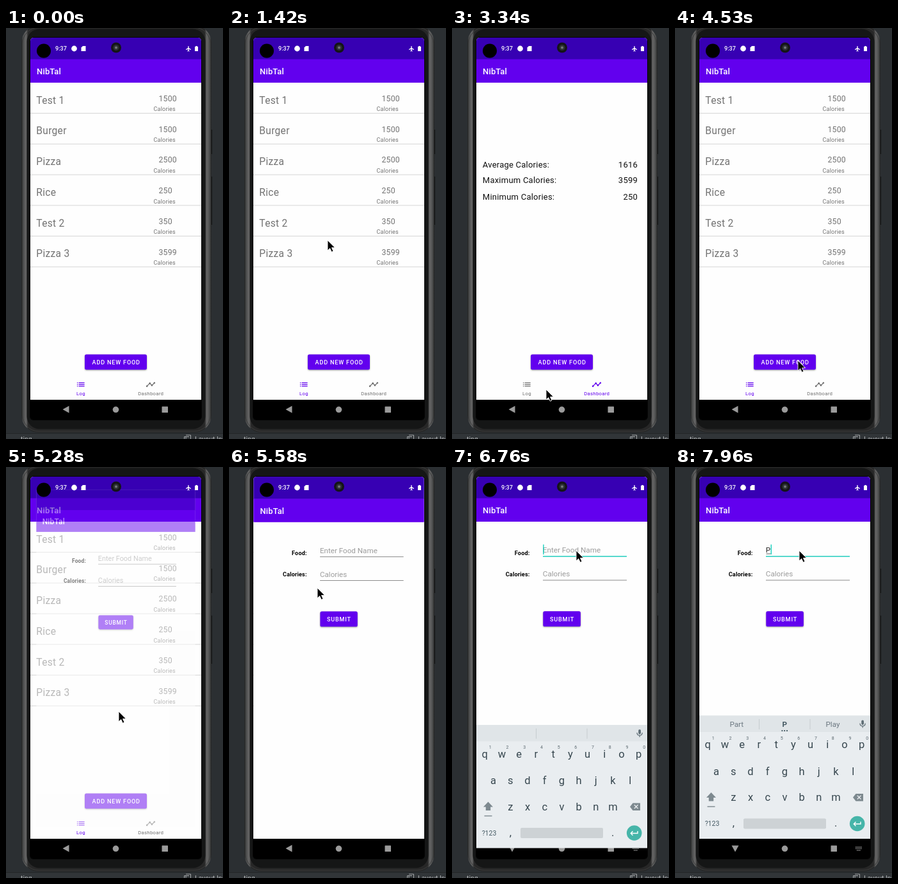
Animation of 339 by 639 pixels, one loop 8 s. Source, as an HTML page:

```html
<!DOCTYPE html>
<html lang="en">
<head>
<meta charset="utf-8">
<title>Food log</title>
<style>
html, body { margin: 0; width: 100%; height: 100%; overflow: hidden; background: #2b2f32; }
svg { display: block; width: 339px; height: 639px; font-family: Roboto, sans-serif; }
.title { font: 500 13px Roboto, sans-serif; letter-spacing: .0125em; fill: #fff; }
.btn { font: 500 9.1px Roboto, sans-serif; letter-spacing: .0893em; fill: #fff; text-anchor: middle; }
.food { font-size: 15.6px; letter-spacing: .0179em; fill: #737373; }
.num { font-size: 12.3px; letter-spacing: .0179em; fill: #737373; }
.unit { font-size: 9.1px; letter-spacing: .0179em; fill: #737373; }
.stat { font-size: 13px; letter-spacing: .0179em; fill: #111; }
.end { text-anchor: end; }
.label { font: 700 9.1px Roboto, sans-serif; letter-spacing: .0179em; fill: #000; text-anchor: end; }
.field { font-size: 11.7px; fill: #9c9c9c; }
.tab { font-size: 7.8px; letter-spacing: .0333em; text-anchor: middle; }
.item { color: #707070; fill: currentColor; stroke: none; }
.item.on { color: #6200ee; }
.key { font-size: 16.5px; fill: #37474f; text-anchor: middle; }
.hint { font-size: 7px; fill: #5c6970; text-anchor: middle; }
.word { font-size: 11.7px; fill: #6b7780; text-anchor: middle; }
.shade { filter: drop-shadow(0 1px 1px rgba(0,0,0,.38)); }
</style>
</head>
<body>
<svg viewBox="0 0 339 639">
  <defs>
    <linearGradient id="rim">
      <stop offset="0" stop-color="#1c1d1d"/><stop offset=".008" stop-color="#4b4c4c"/>
      <stop offset=".025" stop-color="#666"/><stop offset=".036" stop-color="#272727"/>
      <stop offset=".964" stop-color="#272727"/><stop offset=".975" stop-color="#666"/>
      <stop offset=".992" stop-color="#4b4c4c"/><stop offset="1" stop-color="#1c1d1d"/>
    </linearGradient>
    <clipPath id="screen"><rect x="38" y="15" width="267" height="594" rx="5"/></clipPath>
    <clipPath id="tabs"><rect x="38" y="541" width="267" height="37"/></clipPath>
    <g id="bars">
      <rect x="38" y="15" width="267" height="563" fill="#fefefe"/>
      <rect x="38" y="15" width="267" height="34" fill="#3700b3"/>
      <rect x="38" y="48.5" width="267" height="36.5" fill="#6200ee"/>
      <text class="title" x="48" y="72">NibTal</text>
    </g>
  </defs>

  <rect width="339" height="639" fill="#2b2f32"/>
  <rect y="630" width="339" height="9" fill="#313538"/>
  <path d="M0 630.5H339" stroke="#232628"/>
  <g fill="#b4b7b9" font-size="10.5">
    <text x="23" y="643">ting</text>
    <text x="295" y="643">Layout Inspector</text>
  </g>
  <path d="M278.5 642V635.5H286M281 642V635.5M281 633H288.500V640" fill="none" stroke="#a5a8aa"/>

  <path d="M319 158h3v38h-3zM319 231h3v75h-3z" fill="#101112"/>
  <rect x="24" y="-4" width="297" height="633" rx="27" fill="url(#rim)"/>
  <rect x="26" y="-1" width="293" height="628" rx="25" fill="none" stroke="#3b3c3c"/>
  <rect x="32.500" y="1.500" width="279" height="622" rx="20" fill="#151616"/>
  <rect x="37" y="14" width="269" height="596" rx="6" fill="#050505"/>

  <g clip-path="url(#screen)">
    <rect x="38" y="15" width="267" height="594"/>
    <g id="nav" fill="#9b9b9b">
      <path id="back" d="M88.500 593L98.500 587.500V598.500Z"/>
      <circle cx="171.500" cy="593.300" r="4.800"/>
      <rect x="243.500" y="588.500" width="9.500" height="9.500" rx=".6"/>
      <path id="ime" d="M282 591H292M282 593.300H292M284 596H290" stroke="#9b9b9b" stroke-width="1.300" stroke-dasharray="1.300 .8"/>
    </g>

    <g id="main">
      <use href="#bars"/>
      <g id="log"></g>
      <g id="stats"></g>
      <rect class="shade" x="123" y="507.500" width="97" height="23.700" rx="2.600" fill="#6200ee"/>
      <text class="btn" x="172.200" y="522.900">ADD NEW FOOD</text>
      <circle id="ripple" cy="566" r="34" fill="#ebebeb" clip-path="url(#tabs)"/>
      <g id="tabLog" class="item">
        <path transform="translate(109 546.500) scale(.65)" d="M3 11h2v2H3zM3 15h2v2H3zM3 7h2v2H3zM7 11h14v2H7zM7 15h14v2H7zM7 7h14v2H7z"/>
        <text class="tab" x="117" y="571.400">Log</text>
      </g>
      <g id="tabDash" class="item">
        <g transform="translate(218.200 546.500) scale(.65)">
          <path d="M3 16L10 9L15 14L21 8" fill="none" stroke="currentColor" stroke-width="2"/>
          <circle cx="3" cy="16" r="2"/><circle cx="10" cy="9" r="2"/>
          <circle cx="15" cy="14" r="2"/><circle cx="21" cy="8" r="2"/>
        </g>
        <text class="tab" x="226.200" y="571.400">Dashboard</text>
      </g>
    </g>

    <g id="form">
      <use href="#bars"/>
      <text class="label" x="121.500" y="136.500">Food:</text>
      <text class="label" x="121.500" y="169.900">Calories:</text>
      <text id="name" class="field" x="141.800" y="133">Enter Food Name</text>
      <text class="field" x="141.800" y="170.200">Calories</text>
      <path id="line" d="M142 139H273"/>
      <path d="M142 176H273" stroke="#8b8b8b"/>
      <path id="under" d="M142.500 135H149.500" stroke="#333" stroke-width=".8"/>
      <rect id="caret" y="120.500" width="1.300" height="15.500" fill="#03cdb9"/>
      <rect class="shade" x="142.300" y="224.300" width="58.600" height="23.700" rx="2.600" fill="#6200ee"/>
      <text class="btn" x="172" y="239.700">SUBMIT</text>
    </g>

    <g fill="#fff">
      <text x="77" y="35.400" font-size="9.100" font-weight="500">9:37</text>
      <circle cx="106.500" cy="32" r="4.400"/>
      <path d="M120 28h4.500v8h-7v-5.500z"/>
      <path d="M284.300 28.500q.7-1 1.400 0v2.500l3.300 2v1l-3.300-1v2l1 .8v.7l-1.700-.5-1.700.5v-.7l1-.8v-2l-3.300 1v-1l3.300-2z"/>
      <path d="M296.300 28h2.400v.9h1.300v7.100h-5v-7.100h1.300z"/>
    </g>
    <circle cx="59" cy="35.500" r="11"/>

    <g id="board">
      <rect x="38" y="386.500" width="267" height="191.500" fill="#e9edf0"/>
      <rect x="38" y="386.500" width="267" height="25.500" fill="#e0e5e8"/>
      <path d="M131.500 392V408M211 392V408" stroke="#c6cccf"/>
      <g id="words">
        <text class="word" x="96.300" y="404">Part</text>
        <text class="word" x="171.300" y="404" font-weight="700" style="fill:#455a64">P</text>
        <text class="word" x="246.500" y="404">Play</text>
        <path d="M166.500 410H176" stroke="#455a64" stroke-width="1.800" stroke-dasharray="1.800 2"/>
      </g>
      <rect x="291.200" y="393.500" width="3.800" height="7.500" rx="1.900" fill="#5f6e76"/>
      <path d="M289 398.500Q289 402.800 293.100 402.800T297.200 398.500M293.100 402.800V405.500" fill="none" stroke="#5f6e76" stroke-width="1.200"/>
      <g id="keys"></g>
      <path d="M56.500 506L64 514H60.200V519.500H52.800V514H49Z" fill="#7d898f"/>
      <path d="M50.500 528H62.500" stroke="#7d898f" stroke-width="1.400"/>
      <path d="M278 513.700L282.500 508H294V519.500H282.500Z" fill="#7d898f"/>
      <path d="M284.800 510.800L290.500 516.500M290.500 510.800L284.800 516.500" stroke="#e9edf0" stroke-width="1.300"/>
      <text x="58" y="558" font-size="10.500" fill="#455a64" text-anchor="middle">?123</text>
      <rect x="107" y="546.500" width="129" height="16" rx="2" fill="#cdd2d5"/>
      <circle cx="284.700" cy="554.500" r="11.800" fill="#46b5a9"/>
      <path d="M290 551.500V555H279.500M282.500 551.800L279.300 555L282.500 558.200" fill="none" stroke="#fff" stroke-width="1.400"/>
    </g>
  </g>

  <circle cx="172" cy="30.500" r="8" fill="#141516"/>
  <circle cx="172" cy="30.500" r="4.600" fill="#2d3133"/>
  <circle cx="172" cy="30.500" r="2" fill="#717579"/>

  <path id="mouse" d="M0 0V16L3.700 12.600L6.300 18.200L9 17L6.500 11.600H11.600Z" stroke="#fff" stroke-width=".9"/>
</svg>
<script>
const LOOP = 8000, START = 968, STEP = 148;
const $ = id => document.getElementById(id);
const show = (id, on) => $(id).style.display = on ? '' : 'none';
const text = (cls, x, y, s) => `<text class="${cls}" x="${x}" y="${y}">${s}</text>`;

const foods = [['Test 1', 1500], ['Burger', 1500], ['Pizza', 2500], ['Rice', 250], ['Test 2', 350], ['Pizza 3', 3599]];
$('log').innerHTML = foods.map(([name, cal], i) => {
  const y = i * 47.75;
  return text('food', 47.3, 117.5 + y, name) + text('num', 238.4, 113.9 + y, cal) +
    text('unit', 230.5, 129.3 + y, 'Calories') +
    `<path d="M38 ${132.6 + y}H305" stroke="#d6d6d6"/>`;
}).join('');

const stats = [['Average', 1616, 216.7], ['Maximum', 3599, 240.5], ['Minimum', 250, 266.6]];
$('stats').innerHTML = stats.map(([kind, cal, y]) =>
  text('stat', 47.8, y, kind + ' Calories:') + text('stat end', 290, y, cal)).join('');

const rows = [['qwertyuiop', 51.3, 437.3], ['asdfghjkl', 64.6, 478.6], ['zxcvbnm', 91.3, 519.2]];
$('keys').innerHTML = rows.map(([row, x, y], r) => [...row].map((c, i) => {
  const cx = x + i * 26.7;
  return text('key', cx, y, c) + (r ? '' : text('hint', cx + 8.5, y - 13.8, (i + 1) % 10));
}).join('')).join('') + text('key', 91.3, 559, ',') + text('key', 251.3, 559, '.');

// pointer stops: step, x, y
const path = [
  [0, 272, 90], [2, 190, 240], [4, 118, 420], [6, 188, 540], [7, 219, 566], [8, 221, 567],
  [12, 221, 567], [16, 147, 562], [18, 114, 566], [20, 114, 566], [23, 182, 525], [24, 192, 517],
  [27, 192, 517], [29, 176, 380], [31, 138, 188], [33, 168, 150], [34, 194, 130]
];
function pointer(k) {
  const i = path.findIndex(p => p[0] > k);
  if (i < 0) return path[path.length - 1].slice(1);
  const [a, x, y] = path[i - 1], [b, x2, y2] = path[i];
  const u = (k - a) / (b - a);
  return [x + (x2 - x) * u, y + (y2 - y) * u];
}

const zoom = { 29: .93, 30: .986, 31: .9965 };
const rise = { 39: 14.5, 40: 3 };

function draw(k) {
  show('mouse', k >= 0);
  if (k >= 0) $('mouse').setAttribute('transform', `translate(${pointer(k)})`);

  const dash = k >= 11 && k < 20;
  show('log', !dash);
  show('stats', dash);
  $('tabLog').classList.toggle('on', !dash);
  $('tabDash').classList.toggle('on', dash);
  const first = k === 10 || k === 11, second = k === 19 || k === 20;
  show('ripple', first || second);
  $('ripple').setAttribute('cx', first ? 223 : 115);
  $('ripple').setAttribute('opacity', k === 11 || k === 20 ? .5 : 1);

  const s = zoom[k] || 1;
  show('form', k >= 29);
  $('form').setAttribute('transform', `translate(171.5 312) scale(${s}) translate(-171.5 -312)`);
  $('form').setAttribute('opacity', k === 29 ? .5 : 1);

  const focus = k >= 36, typed = k >= 45;
  $('line').setAttribute('stroke', focus ? '#1fcdbc' : '#8b8b8b');
  $('line').setAttribute('stroke-width', focus ? 1.4 : 1);
  $('name').textContent = typed ? 'P' : 'Enter Food Name';
  $('name').style.fill = typed ? '#222' : '';
  show('under', typed);
  show('caret', focus && (k < 43 || typed));
  $('caret').setAttribute('x', typed ? 149.6 : 142.3);

  const open = k >= 39;
  show('board', open);
  $('board').setAttribute('transform', `translate(0 ${rise[k] || 0})`);
  show('words', k >= 46);
  show('ime', k >= 37);
  $('back').setAttribute('transform', open ? 'rotate(-90 94 593)' : '');
}

function tick() {
  draw(Math.floor((performance.now() % LOOP - START) / STEP));
  requestAnimationFrame(tick);
}
tick();
</script>
</body>
</html>
```
